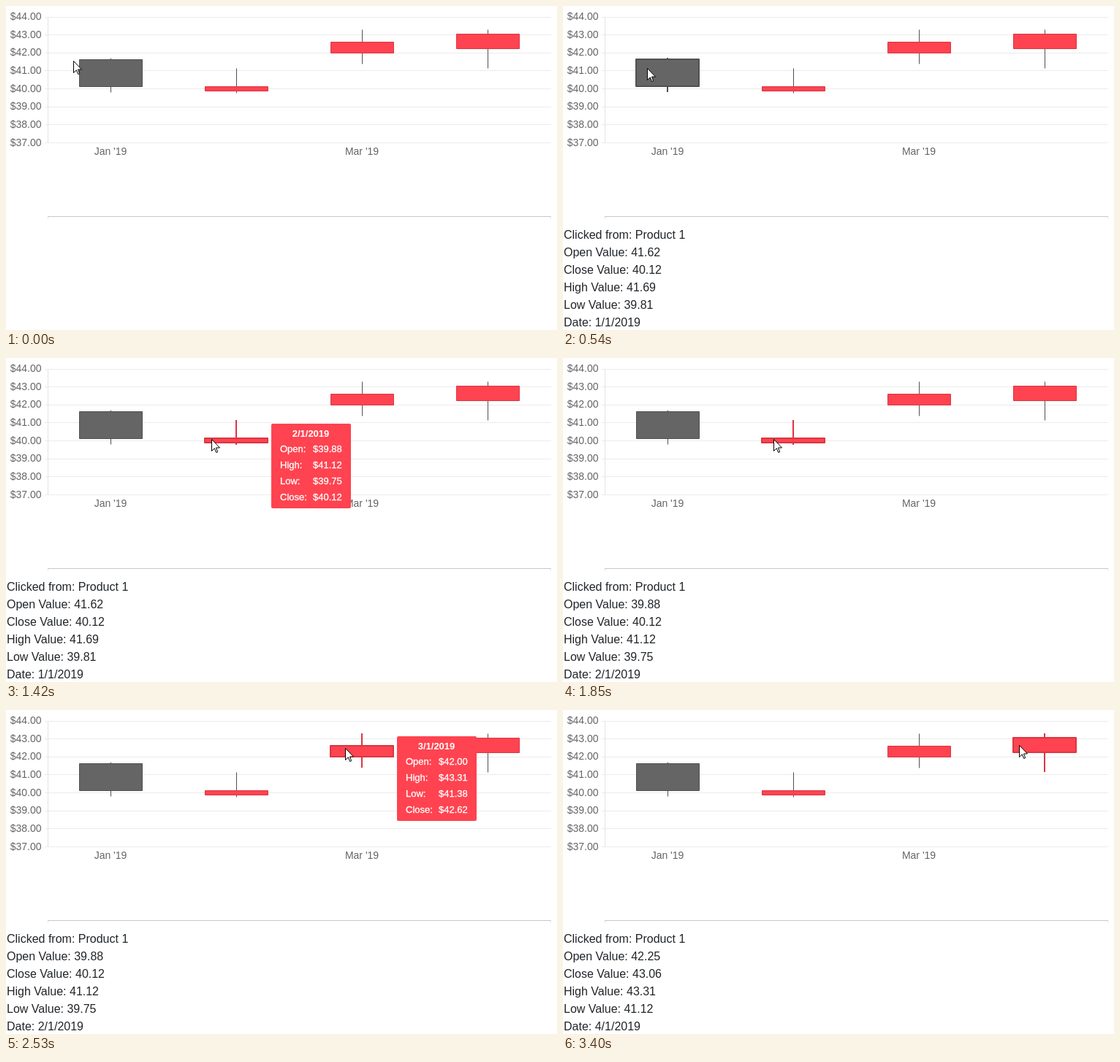
Animation of 754x444 px, one loop 3830 ms. Source, as an HTML page with a canvas:

```html
<!DOCTYPE html>
<html lang="en">
<head>
<meta charset="utf-8">
<title>Candlestick chart</title>
<style>
html, body { margin: 0; width: 100%; height: 100%; overflow: hidden; background: #fff; }
canvas { display: block; }
</style>
</head>
<body>
<canvas id="stage" width="754" height="444"></canvas>
<script>
const ctx = document.getElementById('stage').getContext('2d');
const WIDTH = 754, HEIGHT = 444;
const LOOP = 3830, STEP = 109.5, LEAD = 12;
const FONT = '"Liberation Sans", Arial, sans-serif';
const GRAY = { fill: '#656565', line: '#515151' };
const RED = { fill: '#ff4350', line: '#d93743' };
const HALF = 43;

const yOf = value => 186.8 - (value - 37) * 24.6;

const candles = [
  { open: 41.62, high: 41.69, low: 39.81, close: 40.12 },
  { open: 39.88, high: 41.12, low: 39.75, close: 40.12 },
  { open: 42, high: 43.31, low: 41.38, close: 42.62 },
  { open: 42.25, high: 43.31, low: 41.12, close: 43.06 }
].map((c, i) => ({
  ...c,
  date: `${i + 1}/1/2019`,
  x: 143 + 172 * i,
  top: Math.round(yOf(Math.max(c.open, c.close))),
  bottom: Math.round(yOf(Math.min(c.open, c.close))),
  color: c.close < c.open ? GRAY : RED
}));

// The pointer glides to each candle, then creeps across it until the click
const path = [
  { step: 0, x: 92, y: 75 },
  { step: 5, x: 115, y: 85 },
  { step: 6, x: 115, y: 85 },
  { step: 10, x: 276, y: 111 },
  { step: 17, x: 288, y: 111 },
  { step: 20, x: 458, y: 52 },
  { step: 25, x: 468, y: 52 },
  { step: 27, x: 619, y: 48 },
  { step: 31, x: 624, y: 48 }
];
const clicks = [5, 15, 24, 31];

function pointerAt(step) {
  const next = path.findIndex(p => p.step > step);
  if (next < 0) return path[path.length - 1];
  const a = path[next - 1], b = path[next];
  const f = (step - a.step) / (b.step - a.step);
  return { x: Math.round(a.x + (b.x - a.x) * f), y: Math.round(a.y + (b.y - a.y) * f) };
}

function hoveredAt(step) {
  const { x, y } = pointerAt(Math.max(0, step));
  return candles.findIndex(c => Math.abs(x - c.x) <= HALF && y >= c.top && y <= c.bottom);
}

function rect(x, y, w, h, color) {
  ctx.fillStyle = color;
  ctx.fillRect(x, y, w, h);
}

function text(str, x, y, size, color, align = 'left', weight = 'normal') {
  ctx.font = `${weight} ${size}px ${FONT}`;
  ctx.textAlign = align;
  ctx.fillStyle = color;
  ctx.fillText(str, x, y);
}

function drawAxes() {
  for (let k = 0; k < 8; k++) {
    rect(53, Math.round(14.5 + 24.6 * k), 693, 1, '#ebebeb');
    text(`$${44 - k}.00`, 48.5, Math.round(19 + 24.65 * k), 14, '#656565', 'right');
  }
  rect(57, 15, 1, 173, '#e4e4e4');
  text("Jan '19", 143, 204, 14, '#656565', 'center');
  text("Mar '19", 487, 204, 14, '#656565', 'center');
  rect(57, 288, 689, 1, '#c8c8c8');
  for (const x of [57, 745]) rect(x, 289, 1, 3, '#e8e8e8');
}

function drawCandle(c, hot) {
  const { x, top, bottom, color } = c;
  const size = hot ? 2 : 1, shift = hot ? 0 : 0.5;
  const high = Math.round(yOf(c.high)) + shift;
  const low = Math.round(yOf(c.low)) + shift;
  rect(x + shift - size / 2, high, size, low - high, hot ? color.line : GRAY.line);
  ctx.beginPath();
  ctx.rect(x - HALF + shift, top + shift, 2 * HALF, bottom - top);
  ctx.fillStyle = color.fill;
  ctx.fill();
  ctx.lineWidth = size;
  ctx.lineJoin = 'round';
  ctx.strokeStyle = color.line;
  ctx.stroke();
}

function drawTip(c) {
  const w = 109, gap = HALF + 5;
  const x = c.x + gap + w > WIDTH ? c.x - gap + 1 - w : c.x + gap;
  const y = Math.round(yOf(c.high) + 4.6);
  ctx.beginPath();
  ctx.roundRect(x, y, w, 116, 2);
  ctx.fillStyle = c.color.fill;
  ctx.fill();
  text(c.date, x + 54, y + 18, 13, '#fff', 'center', 'bold');
  ctx.strokeStyle = '#fff';
  ctx.lineWidth = 0.3;
  ['Open', 'High', 'Low', 'Close'].forEach((name, i) => {
    const row = y + 39 + 22 * i;
    const value = '$' + c[name.toLowerCase()].toFixed(2);
    for (const [str, dx] of [[name + ':', 12], [value, 57]]) {
      text(str, x + dx, row, 13, '#fff');
      ctx.strokeText(str, x + dx, row);
    }
  });
}

function drawDetails(c) {
  [
    'Clicked from: Product 1',
    `Open Value: ${c.open}`,
    `Close Value: ${c.close}`,
    `High Value: ${c.high}`,
    `Low Value: ${c.low}`,
    `Date: ${c.date}`
  ].forEach((line, i) => text(line, 1, 319 + 24 * i, 16, '#212529'));
}

const arrow = new Path2D('M.5 .5V16.5L4.3 12.8L6.7 18.5L8.7 17.7L6.5 12H11.5Z');

function drawPointer({ x, y }) {
  ctx.save();
  ctx.translate(x, y);
  ctx.fillStyle = '#fff';
  ctx.strokeStyle = '#000';
  ctx.lineWidth = 1;
  ctx.fill(arrow);
  ctx.stroke(arrow);
  ctx.restore();
}

function draw(t) {
  const step = Math.floor((t + LEAD) / STEP);
  const clicked = clicks.filter(s => s <= step).length;
  const hovered = hoveredAt(step);
  rect(0, 0, WIDTH, HEIGHT, '#fff');
  drawAxes();
  candles.forEach((c, i) => drawCandle(c, i === hovered));
  if (clicked) drawDetails(candles[clicked - 1]);
  // The tooltip follows one step after the hover and closes on click
  if (hovered >= clicked && hoveredAt(step - 1) === hovered) drawTip(candles[hovered]);
  drawPointer(pointerAt(step));
}

const start = performance.now();
function tick() {
  draw((performance.now() - start) % LOOP);
  requestAnimationFrame(tick);
}
tick();
</script>
</body>
</html>
```
